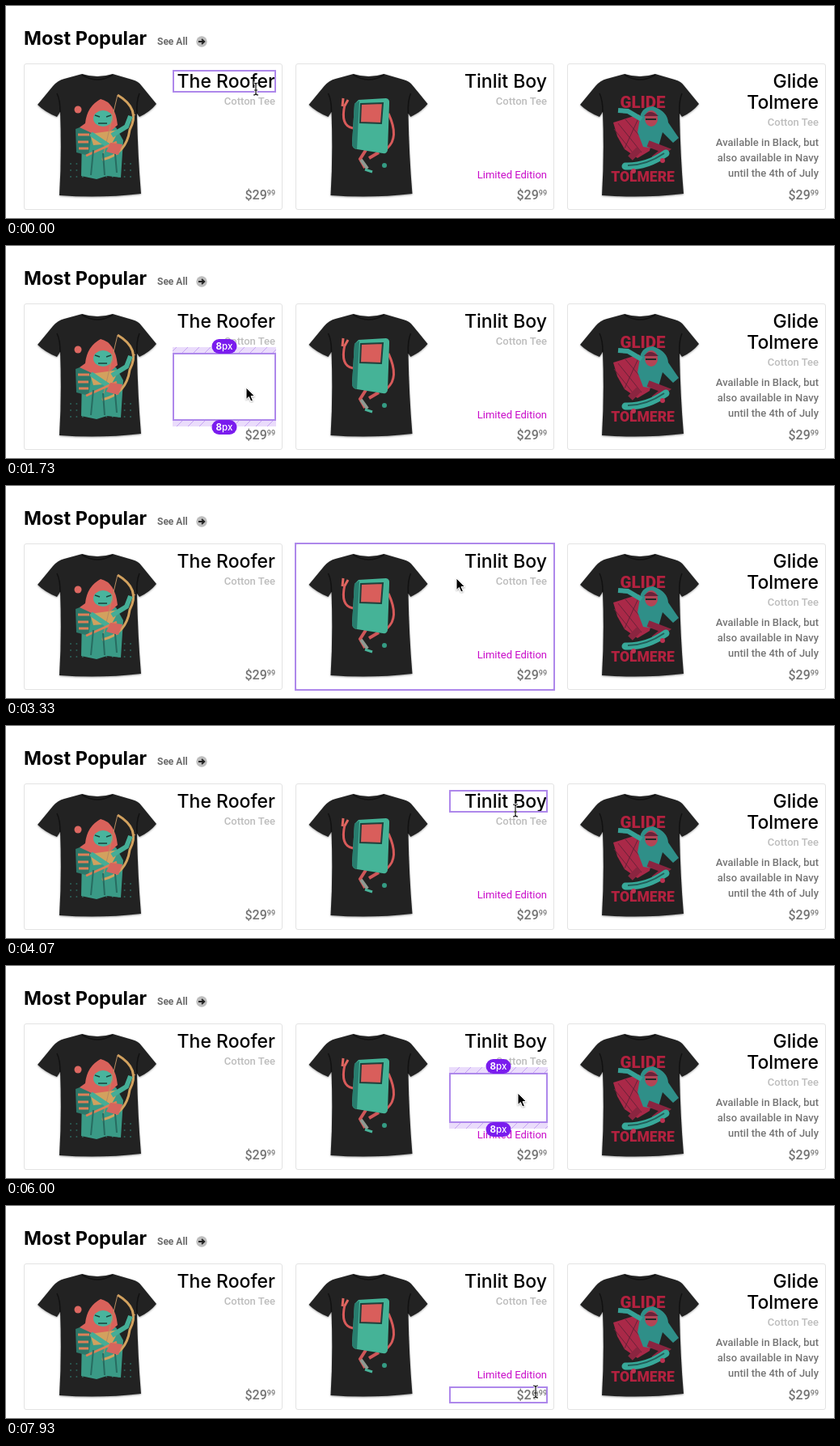
Write an HTML page that moves like this. It is 1024x262 px and loops after 8 s.

```html
<!DOCTYPE html>
<html lang="en">
<head>
<meta charset="utf-8">
<title>Most Popular</title>
<style>
  html, body { margin: 0; width: 100%; height: 100%; overflow: hidden; background: #fff; }
  svg { display: block; width: 100%; height: 100%; }
  text { font-family: Roboto, sans-serif; font-weight: 500; }
  .heading, .title, .pill { font-family: Inter, sans-serif; }
  .heading { font-size: 23.5px; font-weight: 700; }
  .title { font-size: 23px; font-weight: 450; }
  .right { text-anchor: end; }
  .small { font-size: 13px; }
  .tag { font-size: 13px; font-weight: 400; }
  .price { font-size: 16px; fill: #757575; }
  .print { font-weight: 900; fill: #b3213f; text-anchor: middle; }
  .pill { font-size: 11.5px; fill: #fff; text-anchor: middle; }
</style>
</head>
<body>
<svg viewBox="0 0 1024 262">
  <defs>
    <pattern id="stripes" width="14" height="14" patternUnits="userSpaceOnUse">
      <rect width="14" height="14" fill="#eadcfb"/>
      <path d="M-1 15L15 -1M-8 8L8 -8M6 22L22 6" stroke="#c6a3f3"/>
    </pattern>
    <filter id="soft" x="-10%" y="-10%" width="120%" height="120%">
      <feDropShadow dx="0" dy="1" stdDeviation="1" flood-opacity=".35"/>
    </filter>
    <g id="tee">
      <path filter="url(#soft)" fill="#232424" d="M94 84Q113 90 132 84L156 91Q164 93 168 99L186 121Q178 131 165 137L162 133Q163 185 167 232Q116 238 66 234Q69 185 67 131L63 137Q48 131 39 122L58 99Q64 92 72 90Z"/>
      <path fill="none" stroke="#111" stroke-width="1.5" d="M94 85Q113 97 132 85M67 131Q67 116 63 108M162 133Q161 118 165 108"/>
    </g>
  </defs>

  <text class="heading" x="22" y="48">Most Popular</text>
  <text x="187" y="48" font-size="12" style="font-weight:700" fill="#6c6c6c">See All</text>
  <circle cx="242" cy="44" r="6.7" fill="#bdbdbd"/>
  <path d="M238 44h7M242 41l3.3 3-3.3 3" fill="none" stroke="#222" stroke-width="1.8"/>

  <g id="cards"></g>

  <g id="archery">
    <circle cx="89" cy="128" r="4.5" fill="#dd6862"/>
    <g id="dots" fill="#2c625a"></g>
    <path fill="#3a9a86" d="M94 162L105 150H136L145 166L142 212L125 210L112 214L93 210Z"/>
    <path fill="#2d7769" d="M86 152L99 147L106 158L102 185L87 181Z"/>
    <path fill="#d9625b" d="M98 145Q100 124 117 115Q135 119 138 147L127 157H106L91 150Z"/>
    <ellipse cx="120" cy="139" rx="12" ry="10" fill="#49b49d"/>
    <path d="M110 135l6 2M130 135l-6 2M114 145h11" stroke="#1d3f3a" fill="none" stroke-width="1.4"/>
    <path fill="#d2a15e" d="M104 158L140 153L131 170L108 172Z"/>
    <path d="M138 110Q167 127 153 153Q149 183 119 190" fill="none" stroke="#d2a15e" stroke-width="3"/>
    <path d="M138 110L119 190M137 158L160 134" stroke="#b68c61" fill="none"/>
    <path d="M131 160L149 149L154 136M105 158L130 175" stroke="#45ad96" fill="none" stroke-width="6"/>
    <path d="M89 159h14M89 168h13M90 176h12M99 185L137 168" stroke="#dc8058" fill="none" stroke-width="3"/>
    <path d="M108 178l-3 31M120 182l2 27M134 171l3 35" stroke="#286b60" fill="none" stroke-width="2"/>
    <path d="M129 169l15 2-5 13-15-4z" fill="#d6655d"/>
  </g>

  <g id="robot" fill="none">
    <path d="M429 151Q413 148 419 122M473 133Q487 163 471 176" stroke="#d75a5a" stroke-width="3"/>
    <path d="M416 124l1-10M419 123l4-7" stroke="#df6660" stroke-width="3"/>
    <path d="M445 178L438 189L444 200M461 181L449 188" stroke="#cf5759" stroke-width="4"/>
    <path d="M439 190L447 201" stroke="#8f9a92" stroke-width="4"/>
    <path d="M444 202l9 3" stroke="#48b399" stroke-width="3"/>
    <path d="M436 116L470 114Q475 115 474 121L472 178Q471 183 466 182L434 177Q428 176 428 170L431 121Z" fill="#45b397"/>
    <path d="M431 121L428 170Q428 176 434 177L437 117Z" fill="#287c6d"/>
    <path d="M439 121L466 120L464 145L438 144Z" fill="#d95e5b" stroke="#203f3b" stroke-width="2"/>
    <circle cx="468" cy="197" r="3" fill="#349b83"/>
  </g>

  <g id="skater">
    <text class="print" x="787.5" y="126" font-size="20.5">GLIDE</text>
    <text class="print" x="787.5" y="217" font-size="17.5">TOLMERE</text>
    <path fill="#aa2948" d="M751 144L783 134L801 155L796 179L781 188L765 177L756 161Z"/>
    <path d="M757 145L786 181M766 140L795 174M752 152L778 185M783 137L765 176" stroke="#672238" fill="none"/>
    <path fill="#2f8f88" d="M784 139Q785 125 800 124Q818 130 819 144L832 163L825 169L812 156L806 177L788 174L781 156Z"/>
    <path d="M786 140L769 130L757 129" stroke="#36a096" stroke-width="6" fill="none"/>
    <ellipse cx="798" cy="139" rx="8" ry="10" fill="#b44455"/>
    <path d="M789 136Q796 126 807 136Z" fill="#692239"/>
    <path d="M791 140h13" stroke="#262626" stroke-width="2"/>
    <path d="M794 170L815 178L801 189M783 177L772 188" stroke="#8b2540" stroke-width="8" fill="none"/>
    <path d="M766 198Q792 199 816 182" stroke="#37a899" stroke-width="9" stroke-linecap="round" fill="none"/>
    <path d="M769 197Q792 197 814 182" stroke="#225e59" stroke-width="2" fill="none"/>
    <g fill="#bd3150"><circle cx="776" cy="204" r="3"/><circle cx="812" cy="191" r="3"/></g>
  </g>

  <g id="highlight"></g>
  <g id="cursor">
    <path id="arrow" filter="url(#soft)" fill="#000" stroke="#fff" d="M0 0V14.5L3.4 11.4L5.8 17L8.4 15.9L6 10.5H10.5Z"/>
    <g id="beam" fill="none">
      <path id="beamShape" d="M-3 -7Q0 -7 0 -5Q0 -7 3 -7M0 -5V6M-3 8Q0 8 0 6Q0 8 3 8M-2 2H2" stroke="#fff" stroke-width="3"/>
      <path d="M-3 -7Q0 -7 0 -5Q0 -7 3 -7M0 -5V6M-3 8Q0 8 0 6Q0 8 3 8M-2 2H2" stroke="#111" stroke-width="1.2"/>
    </g>
  </g>
</svg>

<script>
const $ = id => document.getElementById(id);
const LOOP = 8000;

const cards = [
  { title: ['The Roofer'] },
  { title: ['Tinlit Boy'], tag: 'Limited Edition' },
  { title: ['Glide', 'Tolmere'], note: ['Available in Black, but', 'also available in Navy', 'until the 4th of July'] }
];

const line = (x, y, text, cls, fill = '#000') =>
  `<text class="right ${cls}" x="${x}" y="${y}" fill="${fill}">${text}</text>`;

$('cards').innerHTML = cards.map((card, i) => {
  const left = 22 + i * 336, right = left + 311;
  const subtitleY = 96 + card.title.length * 26;
  return `<rect x="${left + .5}" y="71.5" width="319" height="180" rx="2.5" fill="#fff" stroke="#e3e3e3"/>
    <use href="#tee" x="${i * 335.5}"/>` +
    card.title.map((t, n) => line(right, 101 + n * 26, t, 'title')).join('') +
    line(right, subtitleY, 'Cotton Tee', 'small', '#bdbdbd') +
    (card.note || []).map((t, n) => line(right, 173 + n * 19, t, 'small', '#757575')).join('') +
    (card.tag ? line(right, 213, card.tag, 'tag', '#c90bc9') : '') +
    line(right, 239, '$29<tspan font-size="9" dy="-5">99</tspan>', 'price');
}).join('');

$('dots').innerHTML = Array.from({ length: 33 }, (_, i) =>
  `<circle cx="${80 + i % 11 * 7.4}" cy="${195 + Math.floor(i / 11) * 8}" r="1"/>`).join('');

// Highlight boxes: x, y, width, height, margin above, margin below
const column = (x, w, spaceHeight) => ({
  title: [x, 80, w, 26],
  sub: [x, 110, w, 15, 4],
  space: [x, 133, w, spaceHeight, 8, 8],
  price: [x, 224, w, 19],
  body: [x, 80, w, 163]
});
const first = { ...column(207, 126, 82), card: [23, 71, 319, 181] };
const second = { ...column(549, 120, 60), card: [358, 71, 320, 181], tag: [549, 202, 120, 15] };

const hovers = [
  [0, first.title, 'beam'],
  [400, first.sub, 'beam'],
  [1000, first.sub, 'arrow'],
  [1130, first.space, 'arrow'],
  [2130, first.price, 'beam'],
  [2800, first.card, 'arrow'],
  [2930, second.card, 'arrow'],
  [3530, second.body, 'arrow'],
  [3670, second.title, 'beam'],
  [4200, second.sub, 'beam'],
  [5130, second.space, 'arrow'],
  [6400, second.body, 'arrow'],
  [6470, second.tag, 'beam'],
  [7330, second.body, 'arrow'],
  [7470, second.price, 'beam']
];

// Cursor stops: time, x, y
const stops = [
  [0, 309, 102], [70, 309, 102], [870, 306, 121], [1000, 306, 121], [1070, 305, 130],
  [1800, 297, 176], [1870, 297, 176], [2270, 316, 227], [2670, 317, 232], [2730, 317, 232],
  [3330, 557, 114], [3530, 571, 107], [4070, 630, 104], [4330, 637, 118], [5000, 637, 118],
  [5330, 633, 157], [6000, 633, 157], [6670, 636, 209], [7000, 636, 209], [7800, 655, 229], [LOOP, 655, 229]
];

const ease = p => p * p * (3 - 2 * p);

function cursorAt(t) {
  const i = stops.findIndex(s => s[0] > t);
  const [t0, x0, y0] = stops[i - 1], [t1, x1, y1] = stops[i];
  const p = ease((t - t0) / (t1 - t0));
  return [x0 + (x1 - x0) * p, y0 + (y1 - y0) * p];
}

const pill = (x, y, size) =>
  `<rect x="${x - 15.5}" y="${y - 9}" width="31" height="18" rx="9" fill="#7a1cee"/>
   <text class="pill" x="${x}" y="${y + 4}"><tspan font-weight="700">${size}</tspan>px</text>`;
const band = (x, y, w, h) =>
  `<rect x="${x - 1}" y="${y}" width="${w + 2}" height="${h}" fill="url(#stripes)"/>`;

function highlight([x, y, w, h, above, below]) {
  const mid = x + w / 2;
  return (above ? band(x, y - above, w, above) : '') +
    (below ? band(x, y + h, w, below) : '') +
    `<rect x="${x}" y="${y}" width="${w}" height="${h}" fill="none" stroke="#ae88eb" stroke-width="2"/>` +
    (above ? pill(mid, y - 9, above) : '') +
    (below ? pill(mid, y + h + 9, below) : '');
}

let shown;
function draw(now) {
  const t = now % LOOP;
  const [, box, kind] = hovers.findLast(h => h[0] <= t);
  if (box !== shown) $('highlight').innerHTML = highlight(shown = box);
  const [x, y] = cursorAt(t).map(Math.round);
  $('cursor').setAttribute('transform', `translate(${x} ${y})`);
  for (const id of ['arrow', 'beam']) $(id).style.display = id === kind ? '' : 'none';
}

const start = performance.now();
function tick() {
  draw(performance.now() - start);
  requestAnimationFrame(tick);
}
tick();
</script>
</body>
</html>
```
